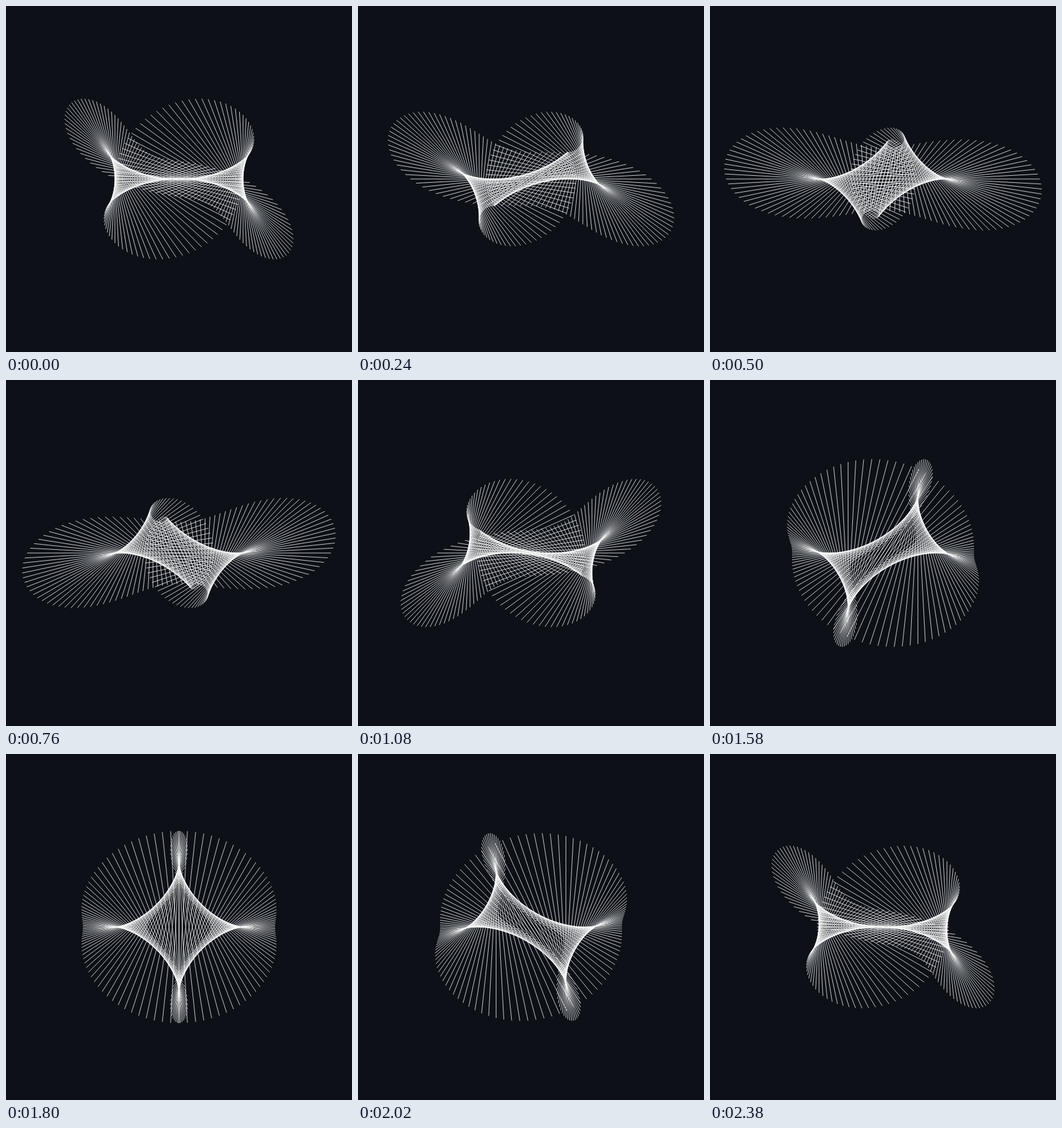
An HTML page that plays this animation: 540 by 540 pixels, repeating every 2.4 s.

```html
<!DOCTYPE html>
<html lang="en">
<head>
<meta charset="utf-8">
<title>Rotating lines</title>
<style>
  html, body { margin: 0; width: 100%; height: 100%; overflow: hidden; background: #0d1117; }
  svg { display: block; width: 100%; height: 100%; }
</style>
</head>
<body>
<svg viewBox="0 0 540 540">
  <path id="lines" fill="none" stroke="#fff" stroke-width="0.75"/>
</svg>
<script>
  const LOOP = 2400, STEP = 20, COUNT = 120, MID = 270;
  const TAU = Math.PI * 2;
  const path = document.getElementById('lines');

  // Each line keeps its angle; its centre slides along the x axis
  // while its half-length swells and shrinks.
  function draw(ms) {
    const phase = Math.floor((ms % LOOP) / STEP) * STEP / LOOP * TAU;
    let d = '';
    for (let i = 0; i < COUNT; i++) {
      const a = i / COUNT * TAU;
      const cx = MID + 100 * Math.sin(a + phase);
      const r = 100 + 50 * Math.sin(2 * a + phase);
      const dx = r * Math.cos(a), dy = r * Math.sin(a);
      d += `M${(cx - dx).toFixed(2)} ${(MID - dy).toFixed(2)}L${(cx + dx).toFixed(2)} ${(MID + dy).toFixed(2)}`;
      // separate strokes let crossings build up brightness
      if (!segs[i]) {
        segs[i] = path.cloneNode();
        segs[i].removeAttribute('id');
        path.parentNode.appendChild(segs[i]);
      }
      segs[i].setAttribute('d', d);
      d = '';
    }
  }

  const segs = [];
  function tick() {
    draw(performance.now());
    requestAnimationFrame(tick);
  }
  draw(0);
  requestAnimationFrame(tick);
</script>
</body>
</html>
```
